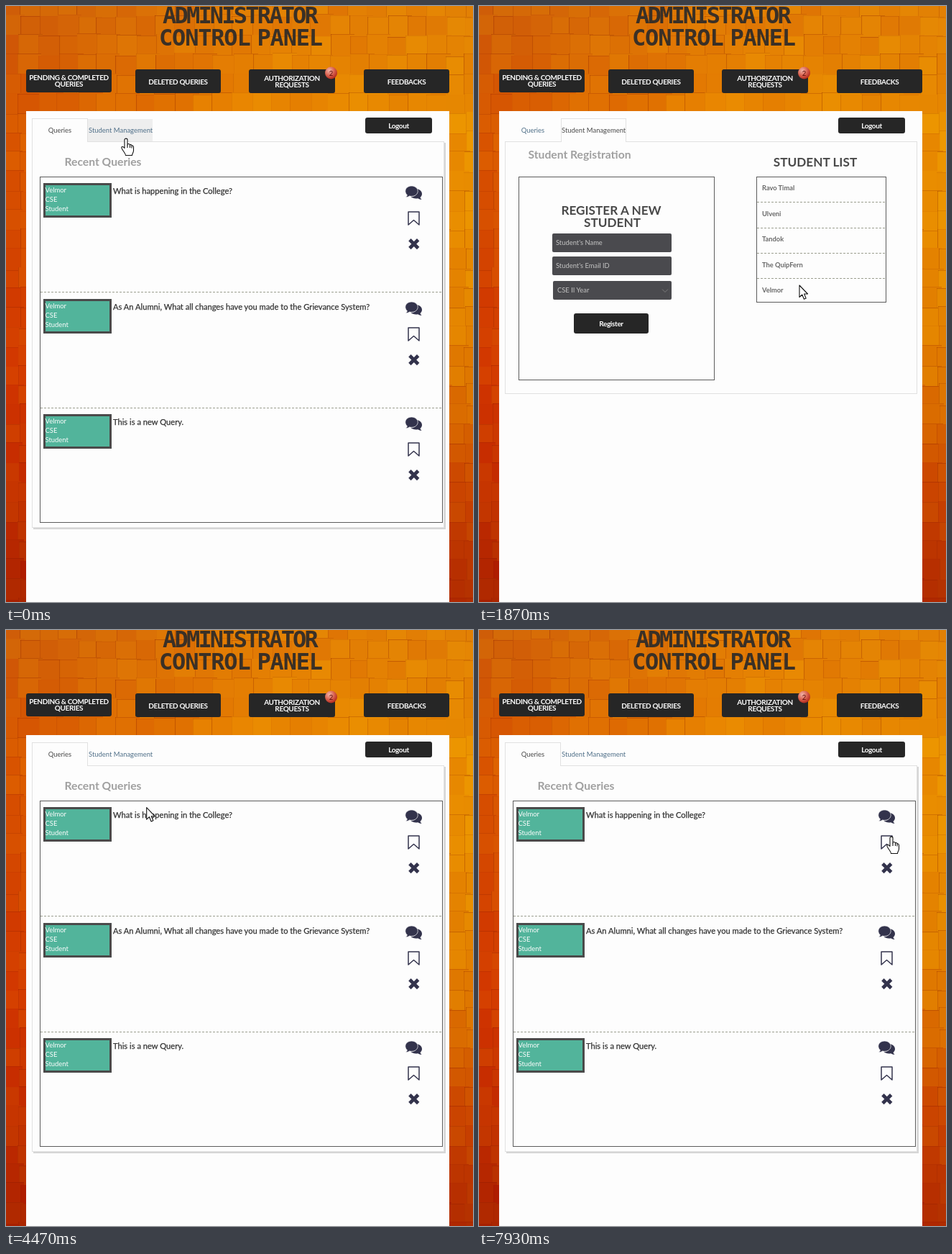
Recreate the animation shown at these times as an HTML page with a canvas. Size 650 by 828 pixels, loop 8 s.

```html
<!DOCTYPE html>
<html lang="en">
<head>
<meta charset="utf-8">
<title>Administrator control panel</title>
<style>
html, body { margin: 0; width: 100%; height: 100%; overflow: hidden; background: #d86c00; }
canvas, svg { position: absolute; left: 0; top: 0; width: 650px; height: 828px; }
text { font-family: Lato, "Open Sans", sans-serif; white-space: pre; }
.title { font: bold 32px "DejaVu Sans Mono", monospace; fill: #3a3026; word-spacing: -8px; }
.btn { font-size: 10px; font-weight: 700; fill: #fdfdfd; letter-spacing: -.37px; text-anchor: middle; }
.small { font-size: 9.45px; }
.head { font-size: 15.7px; font-weight: 700; fill: #a0a0a0; text-anchor: middle; }
.caps { font-size: 17.2px; font-weight: 700; fill: #4a4a4a; text-anchor: middle; }
.query { font-size: 11.15px; fill: #333; stroke: #333; stroke-width: .25px; }
.name { font-size: 9.3px; font-weight: 700; fill: #686868; }
.hint { font-size: 9.4px; fill: #c4c4c4; }
.box { fill: none; stroke: #5c5c5c; }
.dash { fill: none; stroke: #9c9f90; stroke-dasharray: 3 2; }
.soft { fill: none; stroke: #e1e1e1; }
.cursor { fill: #fff; stroke: #111; stroke-width: 1.1; stroke-linejoin: round; }
</style>
</head>
<body>
<canvas id="wall" width="650" height="828"></canvas>
<canvas id="wallBig" width="650" height="828"></canvas>
<svg id="stage" viewBox="0 0 650 828"></svg>
<script>
const LOOP = 8000;
const $ = id => document.getElementById(id);

// ---------- block wall ----------
function seeded(n) {
  return () => (n = (n * 16807) % 2147483647) / 2147483647;
}

function paintWall(id, size, seed, rows) {
  const g = $(id).getContext('2d'), rnd = seeded(seed);
  const grid = rows.map(r => r.split(' ').map(h => [0, 2, 4].map(i => parseInt(h.substr(i, 2), 16))));
  const mix = (a, b, k) => a.map((v, i) => v + (b[i] - v) * k);
  const at = (x, y) => {
    const u = Math.min(1.999, Math.max(0, x / 325));
    const v = Math.min(rows.length - 1.001, Math.max(0, y / 828 * (rows.length - 1)));
    const i = Math.floor(u), j = Math.floor(v);
    return mix(mix(grid[j][i], grid[j][i + 1], u - i), mix(grid[j + 1][i], grid[j + 1][i + 1], u - i), v - j);
  };
  const edge = size / 26;
  for (let y = -size / 2; y < 828 + size; y += size) {
    for (let x = -size / 3; x < 650 + size; x += size) {
      const px = Math.round(x + (rnd() - .5) * size * .16);
      const py = Math.round(y + (rnd() - .5) * size * .16);
      const w = Math.round(size * (1.18 + rnd() * .1)), lift = (rnd() - .5) * 18;
      const [r, gr, b] = at(x, y);
      g.fillStyle = `rgb(${r + lift * .4},${gr + lift},${b})`;
      g.fillRect(px, py, w, w);
      g.fillStyle = `rgba(130,24,0,${rnd() * .32})`;
      g.fillRect(px, py, w, edge);
      g.fillStyle = `rgba(130,24,0,${rnd() * .32})`;
      g.fillRect(px, py, edge, w);
    }
  }
}

paintWall('wall', 27, 77, [
  'd06008 e27c04 e28004', 'da5800 ea8800 ea9000', 'd44600 e48400 e88c00',
  'd43c00 d86800 e07c00', 'c43000 c84000 cc4800', 'a82000 ac2800 b02c00']);
paintWall('wallBig', 58, 41, [
  'd45a04 e27c00 e28000', 'd46000 ea8800 ea9000', 'dc7400 ea9000 ea9a00',
  'e48400 ea9800 f6ac00', 'e48e00 ea9800 ea9800', 'de8400 e48400 e48400']);

// ---------- page parts ----------
const text = (cls, x, y, s, more = '') => `<text class="${cls}" x="${x}" y="${y}" ${more}>${s}</text>`;
const rect = (x, y, w, h, more) => `<rect x="${x}" y="${y}" width="${w}" height="${h}" ${more}/>`;
const frame = (cls, x, y, w, h) => rect(x + .5, y + .5, w - 1, h - 1, `class="${cls}"`);
const dash = (x1, x2, y) => `<path class="dash" d="M${x1} ${y}H${x2}"/>`;
const gap = (x1, x2) => `<path d="M${x1} 188.5H${x2}" stroke="#fdfdfd"/>`;
const group = (id, s) => `<g id="${id}">${s}</g>`;

function button(x, y, w, h, lines, base, step = 9.3) {
  return rect(x, y, w, h, 'rx="3" fill="#262626"') +
    lines.map((s, i) => text('btn', x + w / 2, base + i * step, s)).join('');
}

const header =
  text('title', 218, 24, 'ADMINISTRATOR', 'letter-spacing="-2.8"') +
  text('title', 213, 54.5, 'CONTROL PANEL', 'letter-spacing="-1.2"') +
  button(28, 88, 119, 32, ['PENDING &amp; COMPLETED', 'QUERIES'], 103.3, 9) +
  button(180, 88, 119, 33, ['DELETED QUERIES'], 108.5) +
  button(338, 88, 120, 33, ['AUTHORIZATION', 'REQUESTS'], 103.8) +
  button(498, 88, 119, 33, ['FEEDBACKS'], 108.5) +
  '<circle cx="452.5" cy="93" r="8.5" fill="url(#ball)"/>' +
  text('small', 452.5, 97, '2', 'text-anchor="middle" fill="#5a0c08"') +
  rect(28, 146, 589, 682, 'fill="#fdfdfd"') +
  button(500, 155, 93, 22, ['Logout'], 169.7);

const person = 'Velmor';
const students = ['Ravo Timal', 'Ulveni', 'Tandok', 'The QuipFern', person];

const icons = `
  <g fill="#33334c">
    <path d="M572 254c4 1 7 3.600 7 7 0 2-1 3.700-2.500 5 .4 1.200 1.200 2 2.300 2.800-2.400.2-4.200-.5-5.600-1.500-4 .7-7.500-.3-9.700-2.300 6 0 10-4 8.500-11z"/>
    <path d="M564.500 250c5 0 8.700 3.200 8.700 7.200s-3.700 7.200-8.700 7.200c-1 0-2-.1-2.900-.4-1.500 1-3.200 1.700-5.300 1.600 1-.8 1.700-1.700 2.100-2.900-1.600-1.400-2.600-3.300-2.600-5.500 0-4 3.700-7.200 8.700-7.200z" stroke="#fdfdfd" stroke-width=".7"/>
  </g>
  <path d="M560 286h15v18l-7.500-6.500-7.500 6.500z" fill="none" stroke="#33334c" stroke-width="1.500" stroke-linejoin="round"/>
  <path d="M561.900 324.700l11.800 11.800m0-11.800l-11.800 11.800" stroke="#33334c" stroke-width="4.800"/>`;

const entry = (i, s) => `<g transform="translate(0 ${Math.round(i * 160.5)})">` +
  rect(53.5, 247.5, 92, 45, 'fill="#52b49b" stroke="#4a4a4a" stroke-width="3"') +
  [person, 'CSE', 'Student'].map((w, k) => text('small', 54.5, 259 + k * 13, w, 'fill="#fdfdfd"')).join('') +
  group('ask' + i, text('query', 149, 261, s)) + icons + '</g>';

const reply = group('reply',
  text('head', 359.5, 265, 'Reply To ' + person) +
  rect(151, 275, 400, 74, 'rx="2" fill="#4a4a4e"') +
  text('hint', 156, 290, 'Reply Text', 'style="font-size:11.7px"') +
  button(305, 354, 127, 28, ['Send'], 371.5));

const queries = group('queries',
  '<path d="M611 190V726H38" fill="none" stroke="#d6d6d6" stroke-width="2"/>' +
  frame('soft', 36, 188, 574, 537) + frame('soft', 36, 156, 78, 33) + gap(37, 113) +
  rect(114, 157, 90, 31, 'id="hoverStudent" fill="#eee"') +
  text('head', 135, 222, 'Recent Queries') +
  frame('box', 47, 237, 561, 481) +
  dash(48, 607, 397.5) + dash(48, 607, 558.5) +
  ['What is happening in the College?',
   'As An Alumni, What all changes have you made to the Grievance System?',
   'This is a new Query.'].map((s, i) => entry(i, s)).join('') + reply);

const field = (x, y, w, tx, s) =>
  rect(x, y, w, 26, 'rx="2" fill="#4a4a4e"') + text('hint', tx, y + 16, s);

const rowLines = [...Array(16)].map((_, i) => dash(387, 566, 272.5 + i * 35)).join('');

const manage = group('manage',
  rect(37, 157, 76, 31, 'id="hoverQueries" fill="#eee"') +
  text('head', 140, 212, 'Student Registration') +
  frame('box', 55, 237, 273, 283) +
  text('caps', 184, 290, 'REGISTER A NEW') + text('caps', 185.5, 307, 'STUDENT') +
  field(102, 316, 166, 107, "Student's Name") +
  field(102, 348, 166, 107, "Student's Email ID") +
  field(103, 382, 165, 109, 'CSE II Year') +
  '<path d="M255 393.500l4 4 4-4" fill="none" stroke="#7b7b7b"/>' +
  button(132, 427, 104, 28, ['Register'], 444.5) +
  text('caps', 468, 223, 'STUDENT LIST') +
  group('loading', frame('soft', 36, 188, 574, 700) + frame('box', 386, 237, 181, 650) + rowLines) +
  group('loaded', frame('soft', 36, 188, 574, 351) + frame('box', 386, 237, 181, 175) +
    students.map((s, i) => text('name', 394, 256.3 + i * 35.4, s) +
      (i ? dash(387, 566, Math.round(237 + i * 35.3) + .5) : '')).join('')) +
  frame('soft', 114, 156, 91, 33) + gap(115, 204));

const tabLabels =
  text('small', 58.7, 176, 'Queries', 'id="tabQueries"') +
  text('small', 115, 176, 'Student Management', 'id="tabStudent"');

const cursors = `<g id="cursor">
  <path id="arrow" class="cursor" d="M0 0V16.500L3.800 13 6.400 19.300 9.200 18.100 6.600 12H11.500Z"/>
  <g id="hand" class="cursor">
    <path d="M-2 2C-2-.5 2-.5 2 2V9C2 7 5.500 7 5.500 9.500 5.500 8 8 8 8 10.500 8 9.500 10.500 9.500 10.500 12V17C10.500 20 8.500 21 8.500 23.500H-.5C-.5 21-3 19-5.500 14.500-7.500 11.500-4.500 10-2 13.500Z"/>
    <path d="M2 9v4M5.500 10v3M8 11v2.500" fill="none"/>
  </g>
  <path id="beam" d="M-3-7.500H-1Q0-7.500 0-6.500 0-7.500 1-7.500H3M-3 7.500H-1Q0 7.500 0 6.500 0 7.500 1 7.500H3M0-6.500V6.500" fill="none" stroke="#d8d8d8" stroke-width="1.200"/>
</g>`;

$('stage').innerHTML = `<defs><radialGradient id="ball" cx=".35" cy=".3" r=".75">
  <stop offset="0" stop-color="#f2b4a8"/><stop offset=".55" stop-color="#d8604e"/><stop offset="1" stop-color="#b02418"/>
  </radialGradient></defs>` + header + queries + manage + tabLabels + cursors;

// ---------- motion ----------
// time, x, y, pointer shape from this time on
const path = [
  [0, 167, 184, 'hand'], [30, 167, 184, 'hand'], [630, 165, 184, 'hand'],
  [1470, 165, 184, 'hand'], [1500, 182, 196, 'arrow'], [1630, 330, 275, 'arrow'],
  [1770, 330, 275, 'arrow'], [1870, 446, 388, 'arrow'], [2250, 449, 392, 'arrow'],
  [2570, 368, 375, 'arrow'], [3200, 92, 188, 'hand'], [3330, 79, 178, 'hand'],
  [3970, 79, 178, 'hand'], [4080, 92, 190, 'arrow'], [4770, 275, 290, 'arrow'],
  [5130, 600, 284, 'arrow'], [5270, 578, 262, 'hand'], [5370, 572, 255, 'hand'],
  [6000, 572, 255, 'hand'], [6050, 540, 285, 'beam'], [6270, 262, 297, 'beam'],
  [6630, 262, 297, 'beam'], [6880, 390, 338, 'beam'], [7130, 548, 272, 'hand'],
  [7200, 562, 258, 'hand'], [7400, 562, 258, 'hand'], [7430, 574, 255, 'hand'],
  [7570, 574, 255, 'hand'], [7760, 578, 274, 'hand'], [7930, 574, 287, 'hand'],
  [LOOP, 574, 287, 'hand']];

const show = (id, on) => { $(id).style.display = on ? '' : 'none'; };
const within = (t, a, b) => t >= a && t < b;

function draw(t) {
  const onManage = within(t, 930, 3630);
  const loading = within(t, 930, 1060);
  const replying = within(t, 5700, 7570);
  show('wallBig', loading);
  show('queries', !onManage);
  show('manage', onManage);
  show('loading', loading);
  show('loaded', !loading);
  show('reply', replying);
  show('ask0', !replying);
  show('hoverStudent', t < 930);
  show('hoverQueries', within(t, 3200, 3630));
  $('tabQueries').setAttribute('fill', onManage ? '#4f6f88' : '#4a4a4a');
  $('tabStudent').setAttribute('fill', onManage ? '#4a4a4a' : '#4f6f88');

  const i = path.findIndex((p, k) => k === path.length - 2 || t < path[k + 1][0]);
  const [t0, x0, y0, shape] = path[i], [t1, x1, y1] = path[i + 1];
  const k = Math.min(1, (t - t0) / (t1 - t0));
  const x = x0 + (x1 - x0) * k, y = y0 + (y1 - y0) * k;
  $('cursor').setAttribute('transform', `translate(${x.toFixed(1)} ${y.toFixed(1)})`);
  ['arrow', 'hand', 'beam'].forEach(s => show(s, s === shape));
}

const start = performance.now();
function tick() {
  draw((performance.now() - start) % LOOP);
  requestAnimationFrame(tick);
}
tick();
</script>
</body>
</html>
```
